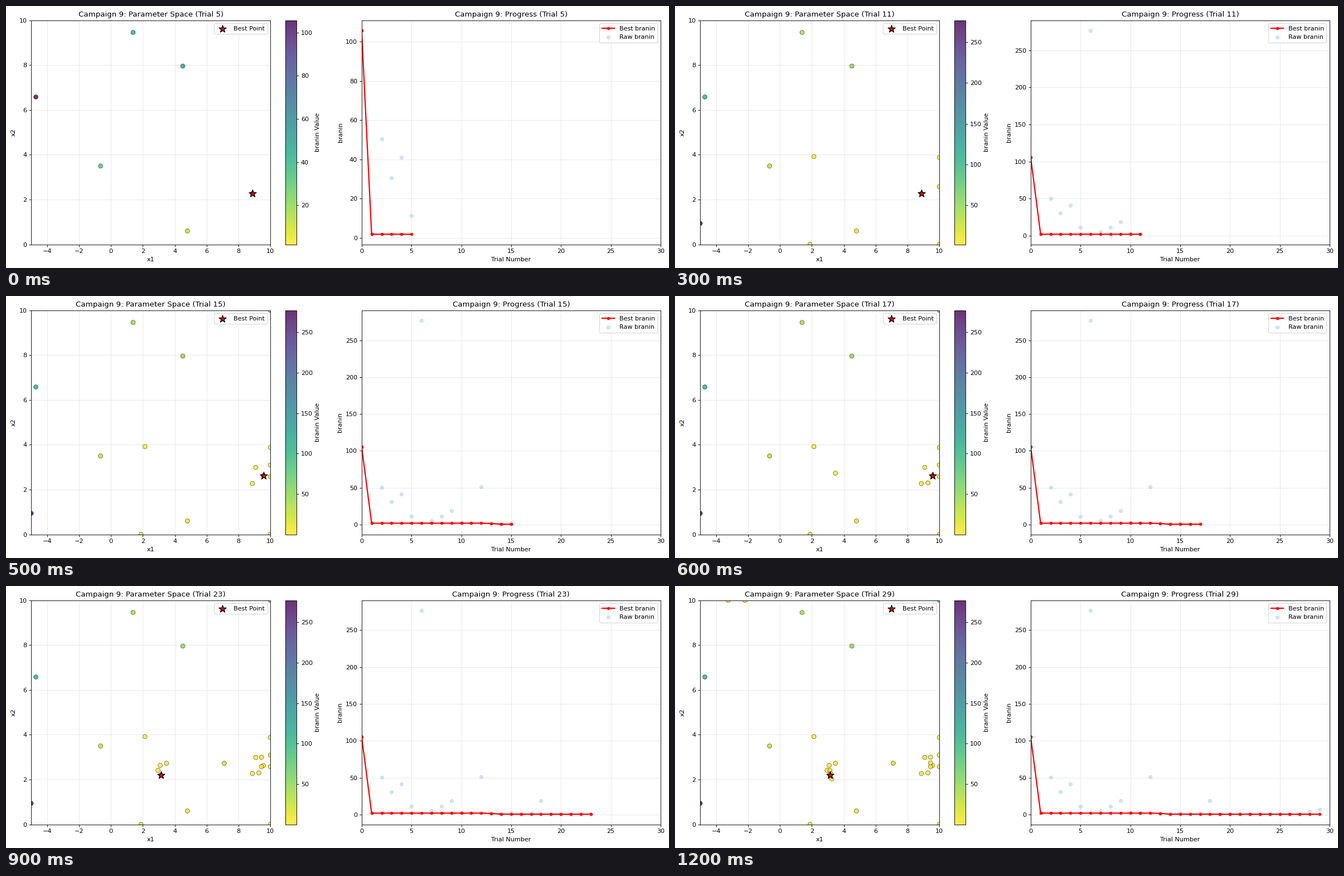
A matplotlib script that plays this animation: 1189 by 471 pixels, repeating every 1300 ms.

```python
import matplotlib.pyplot as plt
import numpy as np
from matplotlib.animation import FuncAnimation

WIDTH, HEIGHT, DPI = 1189, 471, 80
FRAMES, INTERVAL = 13, 100
TOP, BOTTOM = 25.8, 428.6
PANEL_WIDTH = 536.1
LEFT_PANEL, RIGHT_PANEL = 45.2, 637.8

plt.rcParams["font.family"] = "DejaVu Sans"


def branin(x1, x2):
    bowl = x2 - 5.1 / (4 * np.pi**2) * x1**2 + 5 / np.pi * x1 - 6
    return bowl**2 + 10 * (1 - 1 / (8 * np.pi)) * np.cos(x1) + 10


def settle(end, swing):
    """Three steps that swing around a resting place, each smaller."""
    decay = (-0.4) ** np.arange(3)
    return np.array(end) + decay[:, None] * np.array(swing)


def spiral(center, radius, degrees):
    """Three steps that turn inwards around a center."""
    step = np.arange(3)
    angle = np.radians(degrees + 45 * step)
    reach = radius * 0.64**step
    return np.array(center) + np.column_stack(
        (reach * np.cos(angle), reach * np.sin(angle)))


def search_path():
    """Wide start, then a search that closes in on two minima."""
    start = [(-4.71, 6.58), (8.87, 2.27), (4.51, 7.96), (-0.65, 3.5),
             (1.39, 9.46), (4.8, 0.6), (-5, 0.94), (2.13, 3.92),
             (10, 0), (1.89, 0)]
    edge = settle((10, 2.95), (0, 0.93))
    east = settle((3 * np.pi, 2.73), (-0.34, 0.26))
    column = settle((9.445, 2.7), (0, 0.3))
    west = spiral((np.pi, 2.275), 0.57, 53)
    core = settle((3.17, 2.3), (0.08, -0.26))
    return np.vstack([
        start, edge[:2], (10, 10), east[:2], edge[2], (9.28, 2.3),
        west[0], (7.11, 2.73), (np.pi, 2.21), west[1], column[0],
        west[2], column[1], core[0], column[2], core[1:],
        (-2.19, 10), (-3.25, 10),
    ])


POINTS = search_path()
VALUES = branin(*POINTS.T)
BEST = np.minimum.accumulate(VALUES)

fig = plt.figure(figsize=(WIDTH / DPI, HEIGHT / DPI), dpi=DPI)


def add_panel(left, width):
    return fig.add_axes((left / WIDTH, 1 - BOTTOM / HEIGHT,
                         width / WIDTH, (BOTTOM - TOP) / HEIGHT))


def style(ax, title, xlabel, ylabel):
    ax.set(title=title, xlabel=xlabel, ylabel=ylabel)
    ax.grid(True, alpha=0.3)
    ax.legend(loc="upper right")


def draw_space(trial):
    ax = add_panel(LEFT_PANEL, 0.8 * PANEL_WIDTH)
    bar_ax = add_panel(LEFT_PANEL + 0.85 * PANEL_WIDTH, (BOTTOM - TOP) / 20)
    points, values = POINTS[:trial + 1], VALUES[:trial + 1]
    dots = ax.scatter(*points.T, c=values, cmap="viridis_r", s=50, alpha=0.8,
                      edgecolors="black", linewidths=0.5)
    ax.scatter(*points[values.argmin()], c="red", s=150, marker="*",
               edgecolors="black", linewidths=1.2, label="Best Point", zorder=5)
    ax.set(xlim=(-5, 10), ylim=(0, 10))
    style(ax, f"Campaign 9: Parameter Space (Trial {trial})", "x1", "x2")
    fig.colorbar(dots, cax=bar_ax, label="branin Value")


def draw_progress(trial):
    ax = add_panel(RIGHT_PANEL, PANEL_WIDTH)
    trials = np.arange(trial + 1)
    ax.plot(trials, BEST[:trial + 1], "ro-", linewidth=2, markersize=4,
            label="Best branin")
    ax.scatter(trials, VALUES[:trial + 1], c="lightblue", s=30, alpha=0.6,
               label="Raw branin")
    ax.set_xlim(0, 30)
    style(ax, f"Campaign 9: Progress (Trial {trial})", "Trial Number", "branin")


def update(frame):
    trial = 5 + 2 * frame
    fig.clear()
    draw_space(trial)
    draw_progress(trial)
    return []


anim = FuncAnimation(fig, update, frames=FRAMES, interval=INTERVAL,
                     repeat=True, repeat_delay=0, blit=False)
plt.show()
```
